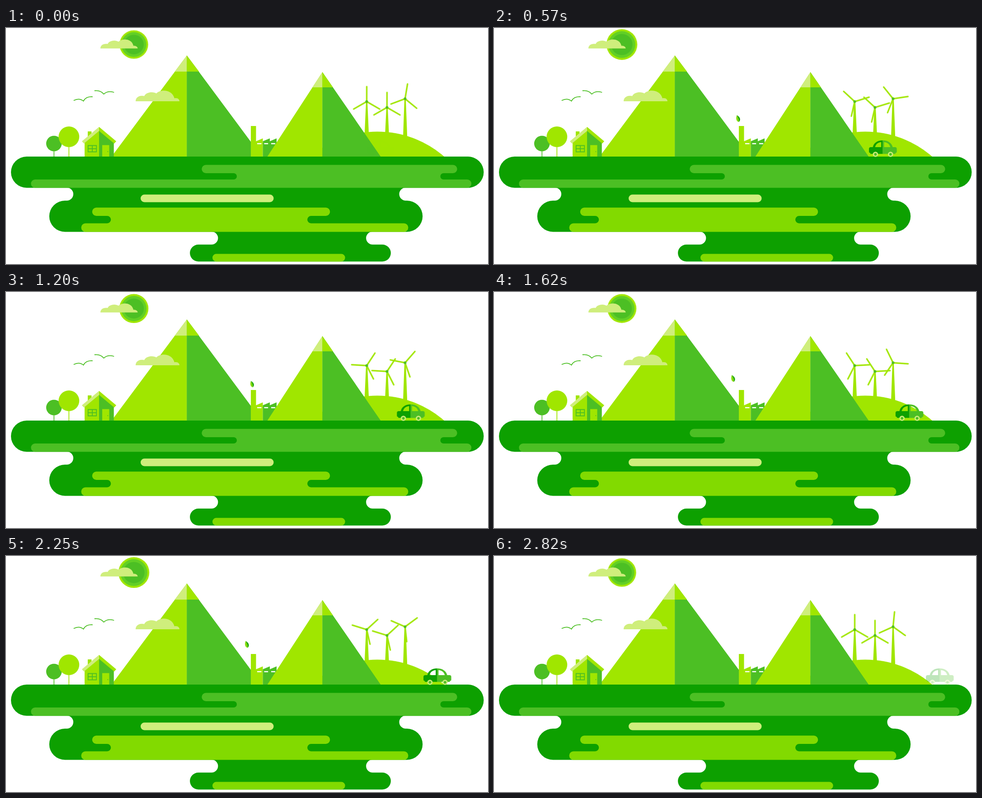
Recreate the animation shown at these times as an HTML page. Size 1067x525 px, loop 2.85 s.

```html
<!DOCTYPE html>
<html lang="en">
<head>
<meta charset="utf-8">
<title>Green landscape</title>
<style>
  :root { --dark: #0da000; --mid: #4cbf24; --lime: #a0e600; --grass: #82da00; --pale: #cfee7c; }
  html, body { margin: 0; width: 100%; height: 100%; overflow: hidden; background: #fff; }
  svg { display: block; width: 1067px; height: 525px; }
  .dark { fill: var(--dark); }
  .mid { fill: var(--mid); }
  .lime { fill: var(--lime); }
  .grass { fill: var(--grass); }
  .pale { fill: var(--pale); }
  .line { fill: none; stroke: var(--mid); stroke-width: 1.8; stroke-linecap: round; }
  .blades { stroke: var(--lime); stroke-width: 3.3; stroke-linecap: round; }

  .sun { animation: pulse 712.5ms cubic-bezier(.37, 0, .63, 1) infinite alternate; }
  .spin { animation: spin 2850ms linear infinite; }
  .spin.late { animation-name: spin-late; }
  .car { animation: drive 2850ms linear infinite, show 2850ms linear infinite; }
  .leaf { animation: float 2850ms linear infinite; }
  .leaf.a { animation-delay: -2573ms; }
  .leaf.b { animation-delay: -1828ms; }
  .leaf.c { animation-delay: -1083ms; }

  @keyframes pulse { from { transform: scale(.92); } to { transform: scale(1); } }
  @keyframes spin { from { transform: rotate(0deg); } to { transform: rotate(363.8deg); } }
  @keyframes spin-late { from { transform: rotate(9.3deg); } to { transform: rotate(369.3deg); } }
  @keyframes drive { from { transform: translateX(798.1px); } to { transform: translateX(957.7px); } }
  @keyframes show {
    0% { opacity: 0; }
    8%, 94.7% { opacity: 1; }
    100% { opacity: .1; }
  }
  @keyframes float {
    0% { transform: translate(549.5px, 213px) scale(.5); opacity: 0; }
    4.2% { transform: translate(547.5px, 208px) scale(.84); opacity: 1; }
    6.1% { transform: translate(545.5px, 205px) scale(.93); }
    10.3% { transform: translate(541px, 201.5px) scale(1); }
    16.8% { transform: translate(534px, 196.8px) scale(1); }
    20.9% { transform: translate(530px, 192.5px) scale(1); opacity: 1; }
    24.6%, 100% { transform: translate(526px, 188px) scale(1); opacity: 0; }
  }
</style>
</head>
<body>
<svg viewBox="0 0 1067 525">
  <defs>
    <g id="rotor">
      <path class="blades" d="M0 0V-33.3M0 0L28.8 16.6M0 0L-28.8 16.6"/>
    </g>
    <g id="leaf">
      <path class="grass" d="M-3.5-7.5C-5.5-2-5.5 6 1 7.5C1.5 2 0-2-3.5-7.5z"/>
      <path class="dark" d="M-3.5-7.5C4-4 6 3.5 1 7.5C1.5 2 0-2-3.5-7.5z"/>
    </g>
  </defs>

  <!-- sky -->
  <g transform="translate(283 36.8)">
    <g class="sun">
      <circle class="lime" r="34.4"/>
      <circle fill="#62cf26" r="30"/>
      <circle class="mid" r="23.7"/>
    </g>
  </g>
  <path class="pale" d="M209 45.5C209 38 216 34 225 35.5C228 28 242 25.5 249 30.5C259 22 279 24 282 39.5C287 39 291.5 41.5 291.5 45.5z"/>
  <path class="line" d="M150.5 161Q162 155 171.5 162.5Q177 152 191 153M196.5 139.5Q209 138 216.5 147Q225 139 238.5 143"/>

  <!-- hill and turbines -->
  <path class="lime" d="M674 287V286A225 225 0 0 1 970 286V287z"/>
  <path class="lime" d="M797 164H800L803.2 236H793.8zM842 177H845L847.8 236H839.2zM882 158H885L888.2 242H879z"/>
  <g transform="translate(798.5 163.7)"><use href="#rotor" class="spin"/><circle class="mid" r="3"/></g>
  <g transform="translate(843.4 176.7)"><use href="#rotor" class="spin"/><circle class="mid" r="3"/></g>
  <g transform="translate(883.4 157.4)"><use href="#rotor" class="spin late"/><circle class="mid" r="3"/></g>

  <!-- large mountain -->
  <path class="lime" d="M400.5 61L233 287H400.5z"/>
  <path class="mid" d="M400.2 61L567 287H400.2z"/>
  <path class="pale" d="M400.5 61L373.5 97H400.5z"/>
  <path class="lime" d="M400.2 61L427.3 97H400.2z"/>
  <path class="pale" d="M287 163C287 154 296 149 306 151.5C310 142 326 141 333 145.5C342 136 367 136 373 156.5C379 155 384 158 384 163z"/>

  <!-- factory -->
  <use href="#leaf" class="leaf a"/>
  <use href="#leaf" class="leaf b"/>
  <use href="#leaf" class="leaf c"/>
  <path class="lime" d="M542 218H553.5V252L568.5 245.5V287H542z"/>
  <path class="mid" d="M568.5 252L584 245.5V252L599 245.5V287H568.5z"/>
  <path fill="#fff" d="M556 256h9.5v2.6h-9.5zM571.5 256h8.7v2.6h-8.7zM587 256h9v2.6h-9z"/>

  <!-- small mountain -->
  <path class="lime" d="M700.5 98L578 287H700.5z"/>
  <path class="mid" d="M700.3 98L830 287H700.3z"/>
  <path class="pale" d="M700.5 98L678.3 132H700.5z"/>
  <path class="lime" d="M700.3 98L723.8 132H700.3z"/>

  <!-- trees -->
  <circle class="mid" cx="106.2" cy="257" r="17.3"/>
  <path class="mid" d="M105.4 273h1.7v14h-1.7z"/>
  <circle class="lime" cx="139.3" cy="242" r="22.9"/>
  <path class="lime" d="M138.4 264h1.8v23h-1.8z"/>

  <!-- house -->
  <path class="lime" d="M181 230h8.3v15h-8.3zM174 254L206.2 226V287H174z"/>
  <path class="mid" d="M206 226L238.7 254V287H206z"/>
  <path class="pale" d="M206 220L168 252L172.5 257L206 229z"/>
  <path class="lime" d="M206 220L244 252L239.5 257L206 229zM213 260.5h15.5V287h-15.5z"/>
  <path class="line" stroke-linecap="butt" d="M181.7 261.5h18.5v14h-18.5zM191 261.5v14M181.7 268.5h18.5"/>
  <circle class="mid" cx="225.3" cy="275" r="1"/>

  <!-- ground -->
  <rect class="dark" x="11" y="286" width="1046.5" height="69.5" rx="34.75"/>
  <path class="dark" d="M134.5 355H885a14.2 14.2 0 0 0 0 29H887.5a34.7 34.7 0 0 1 0 69.5H130.5a34.7 34.7 0 0 1 0-69.5H134.5a14.2 14.2 0 0 0 0-29z"/>
  <path class="dark" d="M455 453H811.5a14.3 14.3 0 0 0 0 28.7H833a18.9 18.9 0 0 1 0 37.8H426a18.9 18.9 0 0 1 0-37.8H455a14.3 14.3 0 0 0 0-28.7z"/>
  <path class="mid" d="M442.5 304.5H989.5a9.25 9.25 0 0 1 0 18.5H968.5a7 7 0 0 0 0 14H1021a9.25 9.25 0 0 1 0 18.5H64.5a9.25 9.25 0 0 1 0-18.5H504a7 7 0 0 0 0-14H442.5a9.25 9.25 0 0 1 0-18.5z"/>
  <rect class="pale" x="298" y="370.5" width="294.5" height="17" rx="8.5"/>
  <path class="grass" d="M200 399.5H708a9.25 9.25 0 0 1 0 18.5H675.3a8.25 8.25 0 0 0 0 16.5H881a9.5 9.5 0 0 1 0 19H176a9.5 9.5 0 0 1 0-19H224a8.25 8.25 0 0 0 0-16.5H200a9.25 9.25 0 0 1 0-18.5z"/>
  <rect class="grass" x="457" y="502.5" width="293.7" height="17" rx="8.5"/>

  <!-- car -->
  <g class="car">
    <path class="dark" fill-rule="evenodd" d="M30.5 250C18 250 10.5 256 8.5 265H4Q0 265 0 269V275Q0 278 3 278V280H30.5zM27 253.7V265H13.5C15 258.5 19.5 254.5 27 253.7z"/>
    <path class="mid" fill-rule="evenodd" d="M30 250C42.5 250 50 256 52.5 265H57.5Q61.5 265 61.5 269V275Q61.5 278 58.5 278V280H30zM33.3 253.7V265H47.2C45.5 258.5 41 254.5 33.3 253.7z"/>
    <circle class="pale" cx="14.3" cy="281" r="5.8"/>
    <circle class="mid" cx="14.3" cy="281" r="2.9"/>
    <circle class="pale" cx="47.7" cy="281" r="5.8"/>
    <circle class="mid" cx="47.7" cy="281" r="2.9"/>
  </g>
</svg>
</body>
</html>
```
